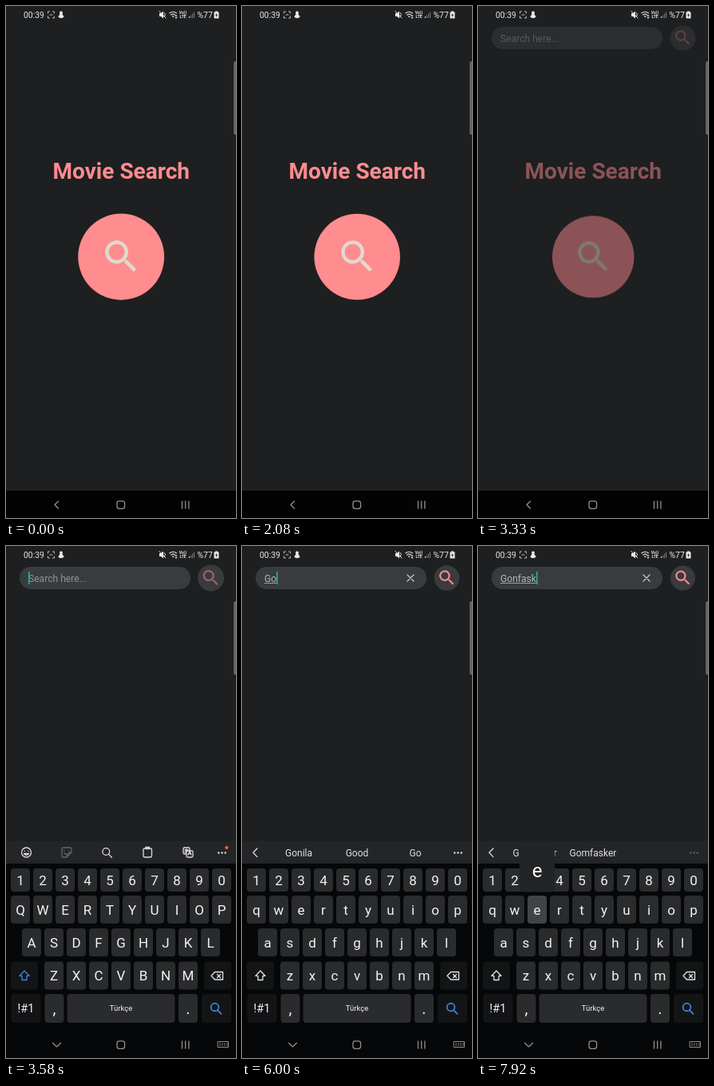
Animation of 288x640 px, one loop 8 s. Source, as an HTML page:

```html
<!DOCTYPE html>
<html lang="en">
<head>
<meta charset="utf-8">
<title>Movie Search</title>
<style>
  html, body { margin: 0; width: 100%; height: 100%; overflow: hidden; background: #1e1f20; }
  svg { display: block; width: 100vw; height: 100vh; font-family: Roboto, sans-serif; }
  .line { fill: none; stroke-width: 1.3; stroke-linecap: round; stroke-linejoin: round; }
  .mid { text-anchor: middle; }
</style>
</head>
<body>
<svg id="stage" viewBox="0 0 288 640">
  <defs>
    <path id="lens" transform="translate(-11.75 -11.75)" d="M15.5 14h-.79l-.28-.27A6.5 6.5 0 1 0 13.73 14.43l.27.28v.79l5 4.99L20.49 19zM9.5 14a4.5 4.5 0 1 1 0-9 4.5 4.5 0 0 1 0 9z"/>
  </defs>
  <rect width="288" height="640" fill="#1e1f20"/>

  <g id="home">
    <text class="mid" x="144.3" y="216.3" font-size="28" font-weight="700" fill="#ff8c8f">Movie Search</text>
    <g id="bigButton">
      <circle r="50" fill="#ff8c8f"/>
      <use href="#lens" transform="translate(-.5 -.8) scale(2.07)" fill="#e2d9cb"/>
    </g>
  </g>

  <g id="search">
    <rect x="17" y="26" width="214" height="28" rx="14" fill="#393c3f"/>
    <text id="hint" x="28" y="44.5" font-size="12.1" fill="#909296">Search here...</text>
    <text id="typed" x="28" y="44.5" font-size="12.1" fill="#b4b7b9"></text>
    <rect id="underline" x="28" y="46" height="1" fill="#9a9d9f"/>
    <rect id="caret" y="32" width="1.6" height="16" fill="#20b2a0"/>
    <path id="clear" class="line" d="M207 36l8 8m0-8l-8 8" stroke="#c4c6c8"/>
    <g id="smallButton">
      <circle r="15.3" fill="#393b3e"/>
      <use id="smallLens" href="#lens" transform="translate(-.3 -.5)" fill="#ff8c8f"/>
    </g>
  </g>

  <g fill="#e8e8e8" font-size="10.4">
    <text x="22" y="14.5">00:39</text>
    <text x="239.5" y="14.5">%77</text>
    <path class="line" stroke="#bbb" style="stroke-width:1" d="M52.5 9V7h2m4 0h2v2m0 4v2h-2m-4 0h-2v-2m2.5-2h3"/>
    <path d="M69 6.5a2 2 0 0 1 1.4 3.4l2.3 3.6q-1.5 1.8-3.7 1.8t-3.7-1.8l2.3-3.6A2 2 0 0 1 69 6.5z"/>
    <path d="M192 9h2l3-2.5v9L194 13h-2z"/>
    <path class="line" stroke="#e8e8e8" style="stroke-width:1" d="M192 6.5l8 8.5m-1.5-6.5q2 2.3 0 4.5"/>
    <path class="line" stroke="#ddd" style="stroke-width:1.1" d="M204.8 9q4.4-3.6 8.8 0m-7 2.2q2.6-2.2 5.2 0"/>
    <path d="M207.7 12.6h3l-1.5 2zM213 11l1.6 2h-3.2zm0 5l1.6-2h-3.2z"/>
    <g font-size="5" font-weight="700" class="mid"><text x="221.5" y="10">Vo))</text><text x="221.5" y="15">LTE</text></g>
    <path d="M229 13h1v2h-1z"/><path opacity=".45" d="M231 11.5h1v3.5h-1zM233 9.5h1v5.5h-1zM235 7.5h1v7.5h-1z"/>
    <path d="M262 6.5h3v1h1.5v8h-6v-8h1.5z"/><path d="M264 8.7l-2 3h1.3l-.3 2.6 2-3.2h-1.3z" fill="#1e1f20"/>
  </g>

  <rect id="homeNav" y="606" width="288" height="34" fill="#030303"/>
  <g id="keyboard">
    <rect y="369" width="288" height="28.5" fill="#232527"/>
    <rect y="397" width="288" height="243" fill="#060708"/>
    <g id="tools" class="line" stroke="#dcdcdc">
      <circle cx="25.5" cy="383" r="6"/><path d="M22.5 384.5q3 3.8 6 0zm.6-3.3v.2m4.8-.2v.2"/>
      <g opacity=".35"><path d="M82 383v-4q0-2-2-2h-8q-2 0-2 2v8q0 2 2 2h4zm-6 6q0-6 6-6m-9-2v.2m6-.2v.2m-6 2.8q2 2 4 1.4"/></g>
      <circle cx="125.3" cy="382" r="4.4"/><path d="M128.6 385.4l3.8 3.8"/>
      <rect x="172" y="378" width="10.5" height="11" rx="2"/><path d="M175 376.5h4.5v2H175z"/>
      <rect x="222" y="377" width="8" height="8" rx="1.5"/><rect x="226" y="381" width="8" height="8" rx="1.5" fill="#232527"/>
      <path d="M224 380h4m-2-1v1.5m-2 2.5l3-3m1 6l2-4.5 2 4.5m-3.3-1.4h2.6"/>
    </g>
    <path id="back" class="line" stroke="#dcdcdc" d="M19 378l-5 5.3 5 5.3"/>
    <g id="dots" fill="#dcdcdc"><circle cx="266.3" cy="383.5" r="1.2"/><circle cx="270.5" cy="383.5" r="1.2"/><circle cx="274.7" cy="383.5" r="1.2"/></g>
    <circle id="badge" cx="276.3" cy="377" r="2.1" fill="#f0662a"/>
    <g id="hints" class="mid" font-size="12" fill="#e0e0e0"></g>
    <g id="keys" class="mid" fill="#f2f2f2"></g>
    <path id="shift" class="line" d="M23 531l6 6.3h-3v5.2h-6v-5.2h-3z"/>
    <path class="line" stroke="#e4e4e4" d="M261.5 532.5h10v9.5h-10l-4.5-4.7zm3 3l4 4m0-4l-4 4"/>
    <g class="line" stroke="#3f86e0" style="stroke-width:1.7"><circle cx="261.5" cy="576.5" r="4.8"/><path d="M265 580.3l4.6 4.6"/></g>
    <g class="line" stroke="#8c8c8c" style="stroke-width:1"><path d="M265.5 619.5h13v7h-13z"/><path stroke-dasharray="1 2" d="M267.5 622h10m-10 2h10"/></g>
    <g id="popup"><rect x="-22" y="-29" width="44" height="56" rx="5" fill="#222426"/><text class="mid" y="8" font-size="24" fill="#fafafa"></text></g>
  </g>

  <g class="line" stroke="#909090">
    <path id="homeBack" d="M65.5 619l-4.5 4.5 4.5 4.5"/>
    <path id="hideKeys" d="M58.5 621.3l5 4.6 5-4.6"/>
    <rect x="139" y="618.8" width="9.6" height="9.6" rx="2.8"/>
    <path d="M220.5 619v9m4.2-9v9m4.2-9v9"/>
  </g>
  <path d="M288 69h-1q-2 0-2 2.5v87q0 2.5 2 2.5h1z" fill="#626365"/>
</svg>
<script>
const LOOP = 8000, PAGE_IN = 3250, KEYS_IN = 3410;
const POPUP_TIME = 170, COMMIT_DELAY = 110;
// Press time, letter, suggestions shown once the letter is entered.
const STROKES = [
  [4890, 'G', []],
  [5500, 'o', ['Gonila', 'Good', 'Go']],
  [6100, 'n', ['Gonila', 'Gone', 'Gon']],
  [6560, 'f', ['Gonfasker', 'Gonila', 'Gonf']],
  [6880, 'a', ['Gonfasker', 'Gonila', 'Gonfa']],
  [7220, 's', ['Gonfasker', 'Gomfasker']],
  [7560, 'k', ['Gonfasker', 'Gomfasker']],
  [7870, 'e', ['Gonfasker', 'Gomfasker']]
];

const $ = id => document.getElementById(id);
const show = (id, on) => { $(id).style.display = on ? '' : 'none'; };
const clamp = v => Math.max(0, Math.min(1, v));
function add(parent, tag, attrs, text = '') {
  const node = document.createElementNS('http://www.w3.org/2000/svg', tag);
  for (const name in attrs) node.setAttribute(name, attrs[name]);
  node.textContent = text;
  return parent.appendChild(node);
}

const keys = {};
function addKey(label, x, y, w, h, size = 17, fill = '#2a2b2d') {
  const box = add($('keys'), 'rect', { x: x - w / 2, y: y - h / 2, width: w, height: h, rx: 4, fill });
  const text = add($('keys'), 'text', { x, y: y + size * .355, 'font-size': size }, label);
  keys[label] = { x, y, box, text };
}
[['1234567890', 18, 417.5, 29], ['qwertyuiop', 18, 454.5, 35], ['asdfghjkl', 32, 495.5, 35], ['zxcvbnm', 60, 537, 35]]
  .forEach(([row, x, y, h]) => [...row].forEach((c, i) => addKey(c, x + 28 * i, y, 24, h)));
addKey('', 23, 537, 34, 35, 15, '#131416');
addKey('', 265, 537, 34, 35, 15, '#131416');
addKey('!#1', 25, 578, 37, 36, 14.5, '#131416');
addKey(',', 60.5, 578, 24, 36, 20);
addKey('Türkçe', 144, 578, 135, 36, 9.5);
addKey('.', 228, 578, 24, 36, 20);
addKey('', 263.5, 578, 37, 36, 15, '#131416');

const hintSlots = [71, 144, 217].map(x => add($('hints'), 'text', { x, y: 387.5 }));

// Triangle wave: 1 at phase 0, 0 at phase .5.
const wave = phase => Math.abs(1 - 2 * (phase - Math.floor(phase)));

function render(t) {
  const page = clamp((t - PAGE_IN) / 160);
  $('home').style.opacity = 1 - page;
  $('search').style.opacity = page;
  const big = 1 + .08 * wave(t / 2000 - .01);
  $('bigButton').setAttribute('transform', `translate(144.2 313.5) scale(${big})`);
  const small = 1 + .09 * wave((t - 6875) / 667);
  $('smallButton').setAttribute('transform', `translate(256.5 40) scale(${small})`);

  const slide = 1 - Math.pow(1 - clamp((t - KEYS_IN) / 150), 2);
  $('keyboard').setAttribute('transform', `translate(0 ${271 * (1 - slide)})`);
  const open = t >= KEYS_IN;
  show('keyboard', open);
  show('homeBack', !open);
  show('hideKeys', open);

  const done = STROKES.filter(s => t >= s[0] + COMMIT_DELAY);
  const last = done[done.length - 1];
  const typing = done.length > 0;
  $('typed').textContent = done.map(s => s[1]).join('');
  const width = typing ? $('typed').getComputedTextLength() : 0;
  $('underline').setAttribute('width', width);
  $('caret').setAttribute('x', 28 + width);
  const blinkFrom = last ? last[0] + COMMIT_DELAY : KEYS_IN;
  show('caret', open && (t - blinkFrom) % 1000 < 500);
  ['clear', 'back'].forEach(id => show(id, typing));
  ['hint', 'tools', 'badge'].forEach(id => show(id, !typing));
  $('smallLens').style.opacity = typing ? 1 : .5;
  $('shift').setAttribute('stroke', typing ? '#e4e4e4' : '#3f86e0');
  $('dots').style.opacity = t > 7850 ? .3 : 1;
  hintSlots.forEach((slot, i) => { slot.textContent = last && last[2][i] || ''; });

  const press = STROKES.find(s => t >= s[0] && t < s[0] + POPUP_TIME);
  const held = press && press[1].toLowerCase();
  for (const c in keys) {
    if (!/^[a-z]$/.test(c)) continue;
    keys[c].text.textContent = typing ? c : c.toUpperCase();
    keys[c].box.setAttribute('fill', c === held ? '#424347' : '#2a2b2d');
  }
  show('popup', press);
  if (press) {
    $('popup').setAttribute('transform', `translate(${keys[held].x} ${keys[held].y - 49})`);
    $('popup').lastElementChild.textContent = press[1];
  }
}

const start = performance.now();
function tick() {
  render((performance.now() - start) % LOOP);
  requestAnimationFrame(tick);
}
tick();
</script>
</body>
</html>
```
